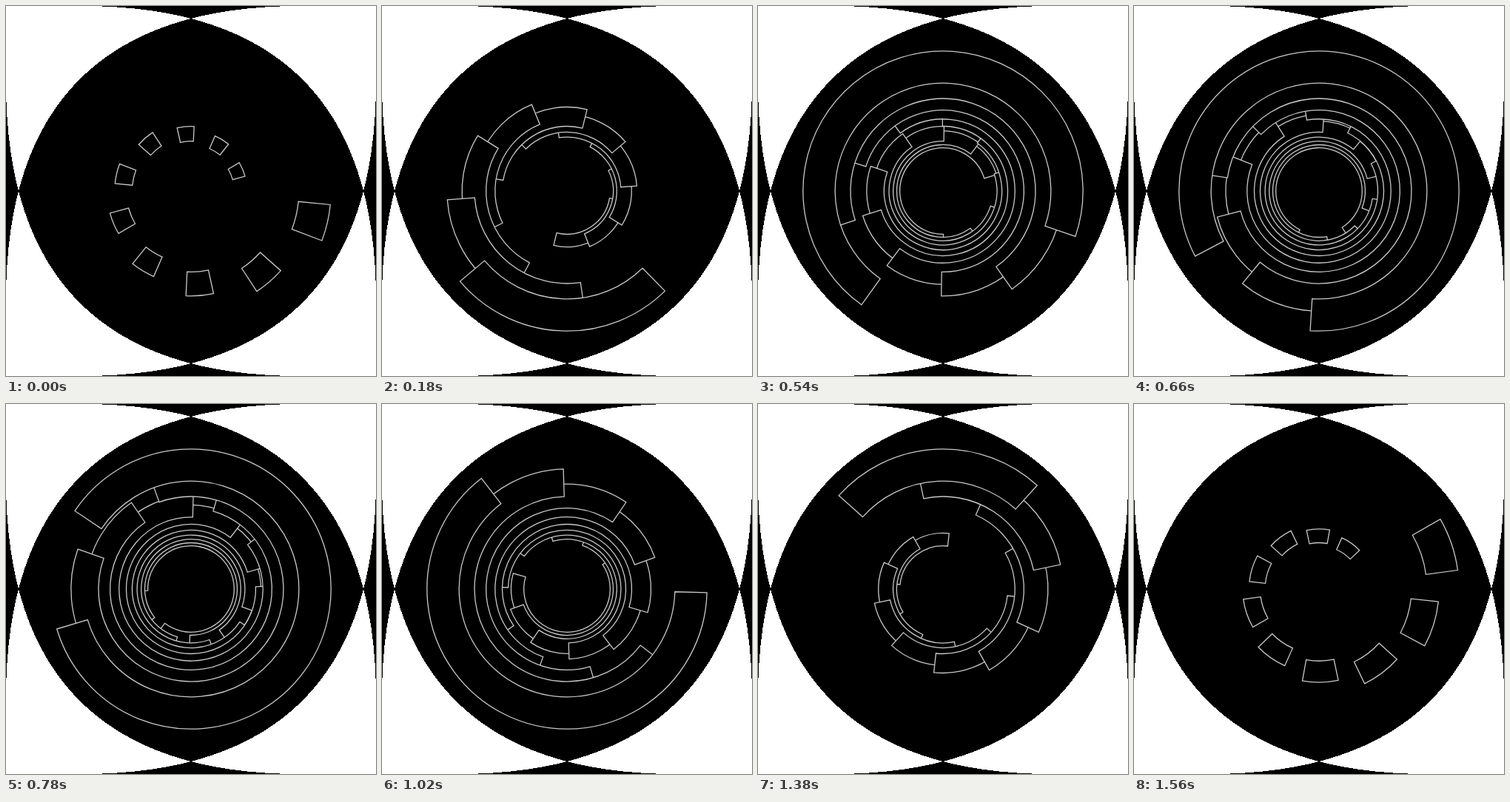
These frames come from a looping animation (500 px wide and 500 px high, 1.62 s). An HTML page:

```html
<!DOCTYPE html>
<html lang="en">
<head>
<meta charset="utf-8">
<title>Spiral of arcs</title>
<style>
  html, body { margin: 0; width: 100%; height: 100%; overflow: hidden; background: #000; }
  svg { display: block; width: 100vw; height: 100vh; }
</style>
</head>
<body>
<svg viewBox="0 0 500 500">
  <rect width="500" height="500"/>
  <path id="corners" fill="#fff" fill-rule="evenodd" shape-rendering="crispEdges"/>
  <g id="blocks" transform="translate(250 250)" fill="#000" stroke="#c8c8c8" stroke-width="1.3"></g>
</svg>
<script>
const NS = 'http://www.w3.org/2000/svg';
const SIZE = 500, REACH = 397;
const STEP = 60, STEPS = 27, COUNT = 10, SPACING = 360 / COUNT;
const INNER = 875, OUTER = 1135, NEAR = 6, REST = 5.6;

// One parabola per corner; where two overlap, even-odd leaves black.
function corner(x, y) {
  const x1 = Math.abs(x - REACH), y1 = Math.abs(y - REACH);
  return `M${x} ${y}L${x1} ${y}Q${x} ${y} ${x} ${y1}Z`;
}
document.getElementById('corners').setAttribute('d',
  [0, SIZE].map(x => [0, SIZE].map(y => {
    const sx = x ? SIZE - REACH : REACH, sy = y ? SIZE - REACH : REACH;
    return `M${x} ${y}L${sx} ${y}Q${x} ${y} ${x} ${sy}Z`;
  }).join('')).join(''));

// The nearest block is drawn last, on top.
const group = document.getElementById('blocks');
const blocks = [];
for (let i = COUNT - 1; i >= 0; i--) {
  blocks[i] = group.appendChild(document.createElementNS(NS, 'path'));
}

// Nearly linear 0..1, bent slightly towards an early finish
function ramp(k, start, end, bend) {
  const p = Math.min(1, Math.max(0, (k - start) / (end - start)));
  return p + bend * p * p * (1 - p);
}

function point(r, deg) {
  const a = deg * Math.PI / 180;
  return (r * Math.cos(a)).toFixed(2) + ' ' + (r * Math.sin(a)).toFixed(2);
}

function sector(r, R, from, to) {
  const large = to - from > 180 ? 1 : 0;
  return `M${point(R, from)}A${R} ${R} 0 ${large} 1 ${point(R, to)}` +
    `L${point(r, to)}A${r} ${r} 0 ${large} 0 ${point(r, from)}Z`;
}

// All blocks turn once per loop; the head runs a lap ahead, then the tail catches up.
function draw(ms) {
  const k = Math.floor(ms / STEP) % STEPS;
  const base = REST + 360 * k / STEPS;
  const head = base + 360 * ramp(k, -0.6, 13.8, 0.25);
  const tail = base + 360 * ramp(k, 11.5, STEPS, 0.05);
  blocks.forEach((b, i) => {
    const depth = NEAR + i, turn = i * SPACING;
    b.setAttribute('d', sector(INNER / depth, OUTER / depth, tail + turn, head + turn));
  });
}

let start = null;
function tick(now) {
  if (start === null) start = now;
  draw(now - start);
  requestAnimationFrame(tick);
}
draw(0);
requestAnimationFrame(tick);
</script>
</body>
</html>
```
